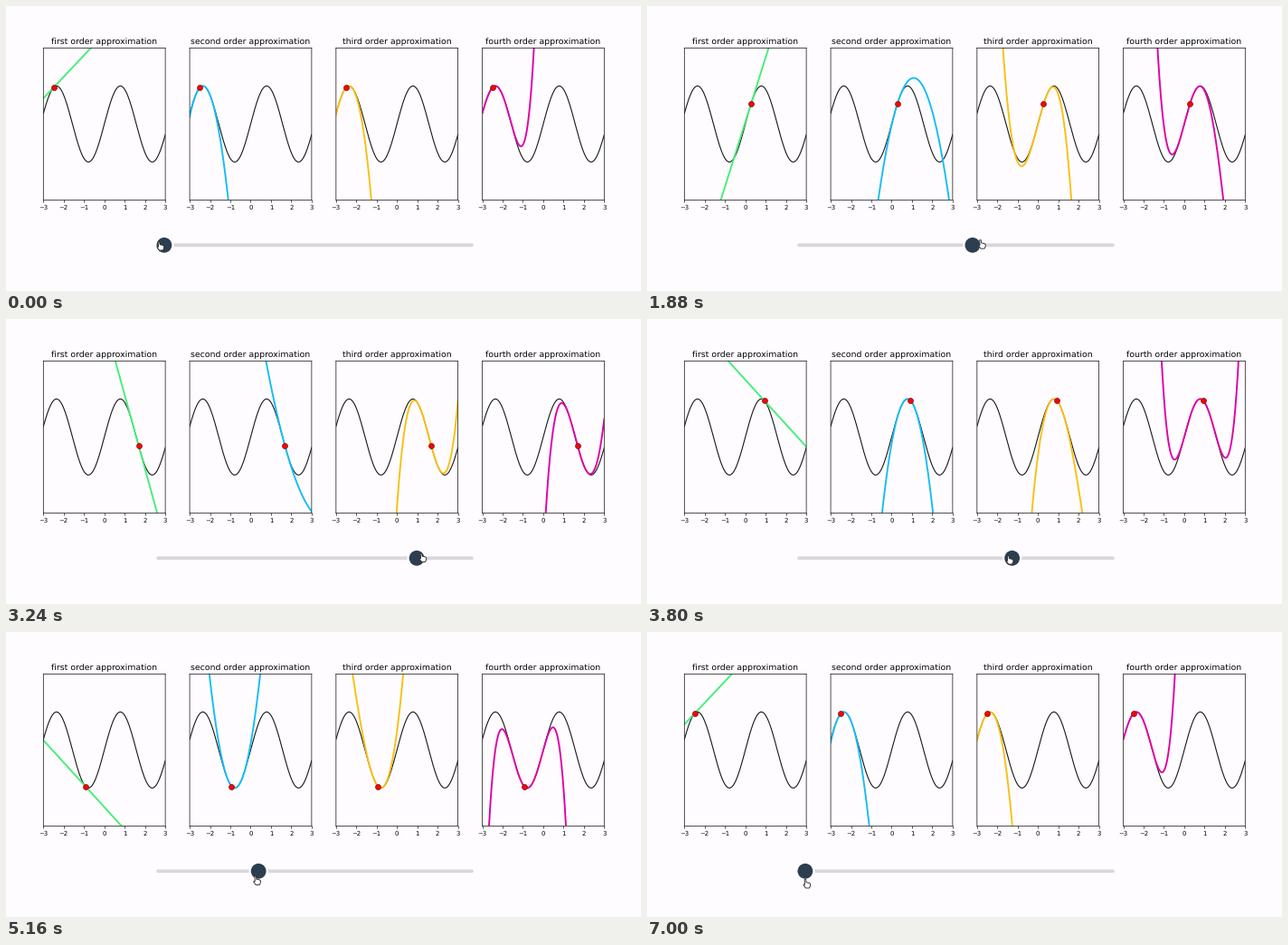
Animation of 702 by 315 pixels, one loop 7040 ms. Source, as a matplotlib script:

```python
import numpy as np
import matplotlib.pyplot as plt
from matplotlib.animation import FuncAnimation
from matplotlib.patches import Circle, Polygon

W, H = 702, 315
FRAMES, STEP = 176, 40
BG = "#fefcff"
TRACK_Y = 264.3
NOTCHES = np.linspace(-2.5, 2.5, 100)

# each drag stroke: time, slider value, pointer offset from the handle
STROKES = np.array([
    (0, -2.5, -4, 1),
    (1200, -1.49, 6, 1),
    (2690, 2.39, 16, -3),
    (3800, 0.935, -2.5, 2),
    (4600, -0.08, -5, 7),
    (5720, -1.742, 2, 14),
    (7000, -2.5, 2, 14),
])

plt.rcParams["font.family"] = "DejaVu Sans"
plt.rcParams["text.hinting"] = "none"

# at 72 dpi one point equals one pixel
fig = plt.figure(figsize=(W / 72, H / 72), dpi=72, facecolor=BG)
xs = np.linspace(-3, 3, 500)


def drag(t):
    """Slider value on its nearest notch, and the pointer offset."""
    value, dx, dy = (np.interp(t, STROKES[:, 0], col) for col in STROKES.T[1:])
    return NOTCHES[np.abs(NOTCHES - value).argmin()], dx, dy


def taylor(x0, order):
    """Taylor polynomial of sin(2x) around x0."""
    h = 2 * (xs - x0)
    total, term = np.zeros_like(xs), np.ones_like(xs)
    for k in range(order + 1):
        total += np.sin(2 * x0 + k * np.pi / 2) * term
        term = term * h / (k + 1)
    return total


def panel(i, name, color):
    """One plot with its fixed sine, returning the moving curve and dot."""
    ax = fig.add_axes([(41.35 + 161.74 * i) / W, 100.6 / H, 134.78 / W, 168 / H],
                      facecolor=BG, xlim=(-3, 3), ylim=(-2, 2))
    ax.set_title(f"{name} order approximation", fontsize=9.33, pad=4.67)
    ax.set_xticks(range(-3, 4))
    ax.set_yticks([])
    ax.tick_params(labelsize=6.9, length=2.7, width=0.65, pad=2.4)
    for spine in ax.spines.values():
        spine.set(linewidth=0.8, snap=False, edgecolor="#262626")
    ax.plot(xs, np.sin(2 * xs), color="#161616", lw=1.1)
    curve, = ax.plot([], [], color=color, lw=1.9)
    dot, = ax.plot([], [], "o", color="#ee0808", ms=6, mec="#7a0000", mew=0.6,
                   zorder=5, snap=False)
    return curve, dot


names = ["first", "second", "third", "fourth"]
colors = ["#45ee78", "#16bcf6", "#fabf12", "#de00a6"]
panels = [panel(i, *style) for i, style in enumerate(zip(names, colors))]

stage = fig.add_axes([0, 0, 1, 1], xlim=(0, W), ylim=(H, 0))
stage.axis("off")
stage.plot([168, 515], [TRACK_Y] * 2, color="#d8d7da", lw=3.8,
           solid_capstyle="round", snap=False)
ring = stage.add_patch(Circle((0, TRACK_Y), 10.7, color=BG, lw=0, zorder=3))
knob = stage.add_patch(Circle((0, TRACK_Y), 8.4, color="#2c3e50", lw=0, zorder=4))
hand = np.array([(-2.8, -4.6), (-2, -5.1), (-1.2, -4.6), (-0.8, -1.6), (2.8, -0.8),
                 (3.9, 0.4), (3.5, 2.8), (2.5, 4.7), (-1.4, 4.7), (-3.9, 1.4),
                 (-3.5, 0.5), (-2.4, 1)])
pointer = stage.add_patch(Polygon(hand, fc="white", ec="#2b2b2b", lw=0.9,
                                  joinstyle="round", zorder=5))


def update(frame):
    x0, dx, dy = drag(frame * STEP)
    for order, (curve, dot) in enumerate(panels, 1):
        curve.set_data(xs, taylor(x0, order))
        dot.set_data([x0], [np.sin(2 * x0)])
    cx = 341.4 + 66.6 * x0
    ring.center = knob.center = (cx, TRACK_Y)
    pointer.set_xy(hand + (cx + dx, TRACK_Y + dy))
    return [*sum(panels, ()), ring, knob, pointer]


anim = FuncAnimation(fig, update, frames=FRAMES, interval=STEP,
                     repeat=True, repeat_delay=0, blit=False)
plt.show()
```
